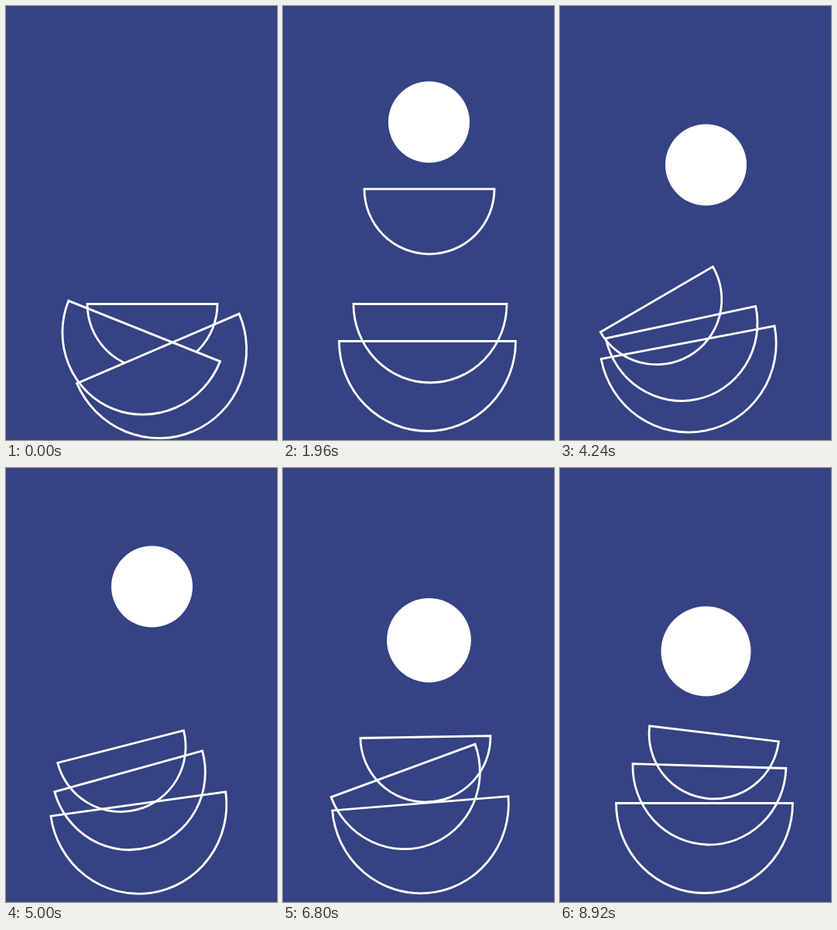
Write an HTML page with a canvas that moves like this. It is 350 px wide and 560 px high and loops after 8.96 s.

```html
<!DOCTYPE html>
<html lang="en">
<head>
<meta charset="utf-8">
<title>Balancing bowls</title>
<style>
  html, body { margin: 0; width: 100%; height: 100%; overflow: hidden; background: #354283; }
  canvas { display: block; width: 350px; height: 560px; }
</style>
</head>
<body>
<canvas id="stage" width="350" height="560"></canvas>
<script>
const LOOP = 8960, STEP = 40, BLUE = '#354283';
const SETTLE = 960, TIP = 3680;
const ctx = document.getElementById('stage').getContext('2d');

// 0 to 1 between two times, along half a cosine.
function ease(t, from, to) {
  const u = Math.min(1, Math.max(0, (t - from) / (to - from)));
  return (1 - Math.cos(Math.PI * u)) / 2;
}

// 0 up to 1 and back.
const hump = (t, from, to) => ease(t, from, (from + to) / 2) - ease(t, (from + to) / 2, to);

// Swings through evenly spaced turning points.
function swing(t, start, beat, ...turns) {
  return turns.reduce((v, turn, i) =>
    i ? v + (turn - turns[i - 1]) * ease(t, start + (i - 1) * beat, start + i * beat) : turn, 0);
}

// Tilts are in degrees; dx and y are added to the rolling motion.
function largePose(t) {
  const tumble = 1 - ease(t, 0, SETTLE);
  return {
    x: 186, r: 114, depth: 116, scale: 1,
    tilt: -23.2 * tumble + swing(t, TIP, 920, 0, -16.1, 4.5, -7.5, 1.2, 0),
    dx: 56 * tumble,
    y: 432 + 1.6 * tumble
  };
}

function mediumPose(t) {
  const tumble = 1 - ease(t, 0, SETTLE);
  return {
    x: 189.5, r: 99, depth: 101.5, scale: 1 + 0.065 * tumble,
    tilt: 17.6 * tumble + 4.2 * (1 - ease(t, SETTLE, 1840))
      + swing(t, TIP, 1040, 0, -21.5, 14.3, -20.2, 7, 1.7),
    dx: -49 * tumble - 17 * hump(t, TIP, 5300),
    y: 384 + 28 * tumble + 22 * hump(t, 2960, 5300)
  };
}

function smallPose(t) {
  const s = Math.max(0, t - TIP);
  return {
    x: 188.5, r: 84, depth: 84, scale: 1,
    tilt: -33.6 * (1 - (s / 5930) ** 2) * Math.sin(2 * Math.PI * s / 3100),
    dx: -19.9 * (ease(t, TIP, 4240) - ease(t, 5000, 7500)),
    y: 384 - 164 * ease(t, 0, 1400) + 94 * ease(t, 1400, 3500) + 50.7 * ease(t, 2960, 4240)
      - 18 * ease(t, 4240, 5800) - 5 * ease(t, 6500, LOOP)
  };
}

function outline(bowl) {
  const rad = bowl.tilt * Math.PI / 180;
  const path = new Path2D();
  path.ellipse(bowl.x + bowl.r * rad + bowl.dx, bowl.y + 0.0147 * bowl.tilt ** 2,
    bowl.r * bowl.scale, bowl.depth * bowl.scale, rad, 0, Math.PI);
  path.closePath();
  return path;
}

function drawBall(t) {
  const y = swing(t, 1230, 1260, 260, 82.4, 230, 152.5, 226.5, 214, 236);
  const r = 52.5 * ease(t, 1250, 1800) + 5.5 * ease(t, 5400, LOOP);
  ctx.fillStyle = '#fff';
  ctx.beginPath();
  ctx.arc(188, y, r, 0, 2 * Math.PI);
  ctx.fill();
}

function draw(t) {
  const [small, medium, large] = [smallPose, mediumPose, largePose].map(pose => outline(pose(t)));
  ctx.setTransform(1, 0, 0, 1, 0, 0);
  ctx.fillStyle = BLUE;
  ctx.fillRect(0, 0, 350, 560);
  ctx.translate(0.5, 0.5);
  ctx.strokeStyle = '#fff';
  ctx.lineWidth = 2.8;
  ctx.stroke(small);
  // The small bowl starts out tucked into the two below it.
  if (t < SETTLE) {
    ctx.save();
    ctx.clip(medium);
    ctx.clip(large);
    ctx.fillRect(0, 0, 350, 560);
    ctx.restore();
  }
  ctx.stroke(medium);
  ctx.stroke(large);
  drawBall(t);
}

const start = performance.now();
function tick() {
  const t = (performance.now() - start) % LOOP;
  draw(Math.floor(t / STEP) * STEP);
  requestAnimationFrame(tick);
}
tick();
</script>
</body>
</html>
```
